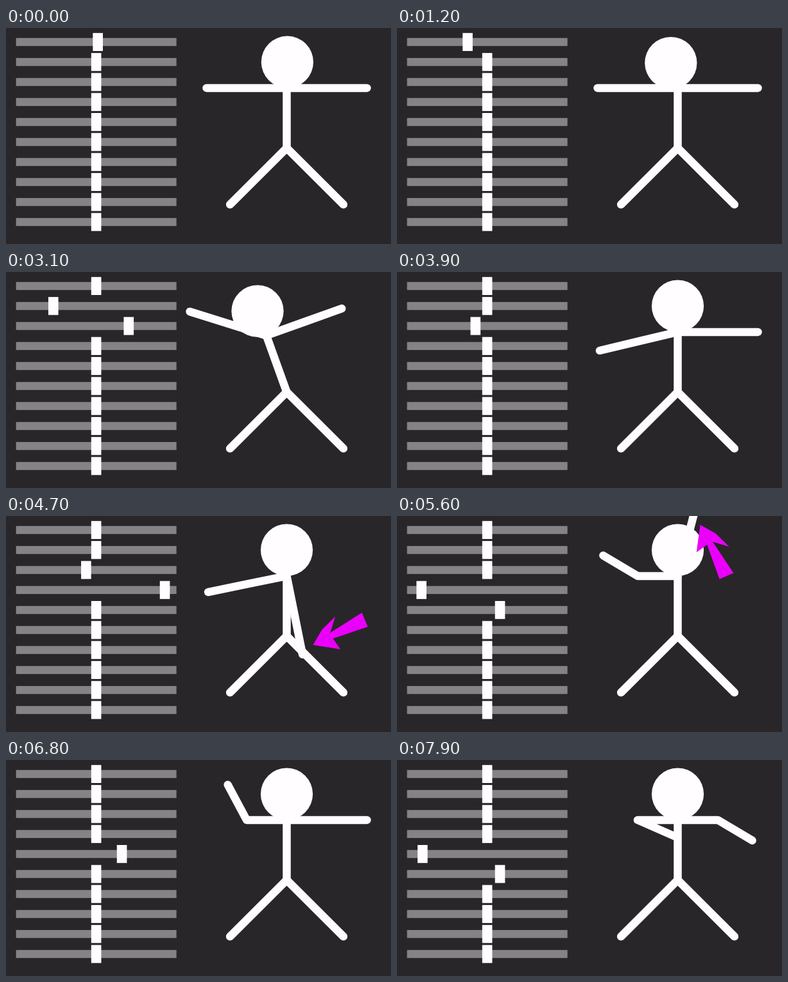
An HTML page with a canvas for the animation above (8 s loop, 600 by 338 pixels).

```html
<!DOCTYPE html>
<html lang="en">
<head>
<meta charset="utf-8">
<title>Slider puppet</title>
<style>
  html, body { margin: 0; width: 100%; height: 100%; overflow: hidden; background: #282629; }
  canvas { display: block; }
</style>
</head>
<body>
<canvas id="stage" width="600" height="338"></canvas>
<script>
const ctx = document.getElementById('stage').getContext('2d');
const WIDTH = 960, HEIGHT = 540, LOOP = 8000, STEP = 100;
const WHITE = '#fffdff', RAD = Math.PI / 180;
const ROWS = 10, TRAVEL = 178.4;
const HEAD_TURN = 55.7, TORSO_TURN = 33, ARM_TURN = 82, FOREARM_TURN = 172.8;

// Each slider makes one sine swing: start and duration in ms
const swings = [[-8, 2220], [1688, 1573], [2967, 1773], [4187, 1735], [5517, 2905], [7817, 2905]];
const arrow = [[0, 0], [37, -25], [81, -40], [52, -9], [145, -20], [143, 18], [52, 7], [57, 39]];

const clamp = x => Math.min(1, Math.max(0, x));
const swing = ([start, length], t) => Math.sin(clamp((t - start) / length) * 2 * Math.PI);
const along = ([x, y], deg, length) =>
  [x + Math.cos(deg * RAD) * length, y + Math.sin(deg * RAD) * length];

function trace(...points) {
  ctx.beginPath();
  points.forEach(p => ctx.lineTo(...p));
}

function line(...points) {
  trace(...points);
  ctx.stroke();
}

function drawSliders(values) {
  for (let i = 0; i < ROWS; i++) {
    const y = 35 + i * 50;
    ctx.fillStyle = '#858385';
    ctx.fillRect(25, y - 10, 400, 20);
    ctx.fillStyle = WHITE;
    ctx.fillRect(212.5 + (values[i] || 0) * TRAVEL, y - 22.5, 25, 45);
  }
}

function drawFigure([head, torso, armL, armR, foreL, foreR]) {
  const lean = torso * TORSO_TURN;
  const hip = [700, 300];
  const neck = along(hip, lean - 90, 150);
  const arm = (side, upper, fore) => {
    const angle = side + lean + upper * ARM_TURN;
    const elbow = along(neck, angle, 100);
    line(neck, elbow, along(elbow, angle + fore * FOREARM_TURN, 100));
  };
  ctx.strokeStyle = ctx.fillStyle = WHITE;
  ctx.lineWidth = 20;
  ctx.lineCap = ctx.lineJoin = 'round';
  line(along(hip, 135, 200), hip, along(hip, 45, 200));
  line(hip, neck);
  arm(180, armL, foreL);
  arm(0, armR, foreR);
  ctx.beginPath();
  ctx.arc(...along(neck, lean + head * HEAD_TURN - 90, 65), 65, 0, 7);
  ctx.fill();
}

// The arrow trails the right hand and flips below it as the arm goes up
function drawArrow(t, armR) {
  if (t < 4500 || t > 6300) return;
  const flip = clamp((t - 4700) / 300);
  ctx.save();
  ctx.translate(...along([700, 150], armR * ARM_TURN * 0.88, 161.6 + armR * 23.9));
  ctx.rotate((-25.7 + 89 * flip) * RAD);
  trace(...arrow);
  ctx.fillStyle = '#ea00fa';
  ctx.fill();
  ctx.restore();
}

const begin = performance.now();
function draw() {
  const now = Math.max(0, performance.now() - begin) % LOOP;
  const t = Math.floor(now / STEP) * STEP;
  const values = swings.map(s => swing(s, t));
  ctx.fillStyle = '#282629';
  ctx.fillRect(0, 0, WIDTH, HEIGHT);
  drawSliders(values);
  drawFigure(values);
  drawArrow(t, values[3]);
  requestAnimationFrame(draw);
}
ctx.scale(600 / WIDTH, 338 / HEIGHT);
draw();
</script>
</body>
</html>
```
